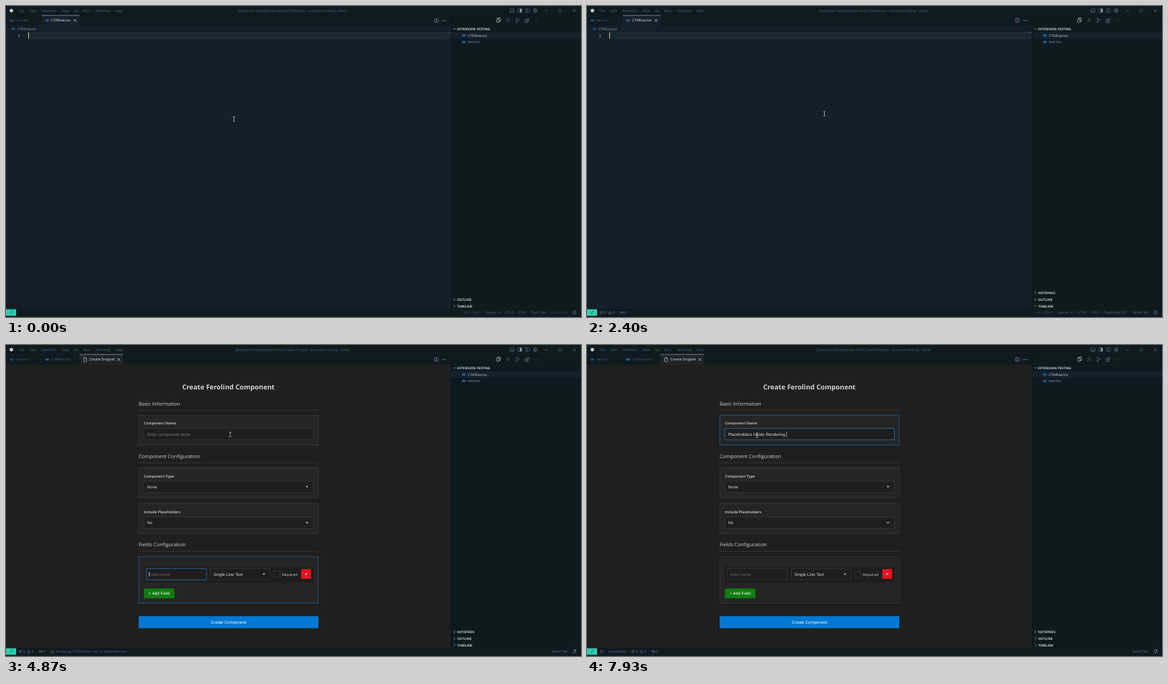
An HTML page for the animation above (8 s loop, 854 by 462 pixels).

```html
<!DOCTYPE html>
<html lang="en">
<head>
<meta charset="utf-8">
<title>Component snippet demo</title>
<style>
html, body { margin: 0; width: 100%; height: 100%; overflow: hidden; background: #101a21; }
svg { display: block; width: 854px; height: 462px; }
text { white-space: pre; text-rendering: geometricPrecision; }
</style>
</head>
<body>
<svg id="stage" viewBox="0 0 854 462" xmlns="http://www.w3.org/2000/svg"></svg>
<script>
const LOOP = 8000;
const UI = "'Open Sans', 'Noto Sans', sans-serif";
const FORM = "'Liberation Sans', Arial, sans-serif";
const DIM = '#526570', BLUE = '#0d6ebd';

// y is the vertical middle of the line
function text(x, y, str, o = {}) {
  const { size = 5.5, fill = DIM, weight = 400, anchor = 'start', font = UI, id } = o;
  return `<text${id ? ` id="${id}"` : ''} x="${x}" y="${y + size * 0.355}" font-size="${size}" fill="${fill}" ` +
    `font-weight="${weight}" text-anchor="${anchor}" font-family="${font}">${str}</text>`;
}
const rect = (x, y, w, h, fill, extra = '') =>
  `<rect x="${x}" y="${y}" width="${w}" height="${h}" fill="${fill}" ${extra}/>`;
const frame = (x, y, w, h, fill, stroke, extra = '') =>
  rect(x, y, w, h, fill, `stroke="${stroke}" stroke-width=".6" rx="1" ${extra}`);
const line = (d, stroke = DIM, w = .7, extra = '') =>
  `<path d="${d}" fill="none" stroke="${stroke}" stroke-width="${w}" ${extra}/>`;
const ring = (x, y, r, stroke = DIM, w = .7) =>
  `<circle cx="${x}" cy="${y}" r="${r}" fill="none" stroke="${stroke}" stroke-width="${w}"/>`;
const group = (id, body, extra = '') => `<g id="${id}" ${extra}>${body}</g>`;
const fileMark = (x, y, fill = '#1c486f') => rect(x + .5, y - 1.7, 5, 3.4, fill, 'rx=".5"');
const cross = (x, y, r, c, w = .8) =>
  line(`M${x - r} ${y - r}l${2 * r} ${2 * r}m0 ${-2 * r}l${-2 * r} ${2 * r}`, c, w);

function titleBar() {
  const menus = [[19, 'File'], [35, 'Edit'], [52, 'Selection'], [82, 'View'], [101, 'Go'],
    [115, 'Run'], [133, 'Terminal'], [162, 'Help']];
  return rect(0, 0, 854, 462, '#101a21') +
    '<circle cx="8" cy="6.8" r="2.6" fill="#c4cdd2"/>' +
    menus.map(([x, s]) => text(x, 7, s, { size: 5.4 })).join('') +
    text(426, 7, '', { size: 5.05, anchor: 'middle', id: 'title' }) +
    [748.5, 760, 771.5].map(x => frame(x, 4, 6, 5.5, 'none', '#5f727d')).join('') +
    rect(763, 4, 3, 5.5, '#7c8e99') + line('M748.5 7.8h6', '#5f727d') + line('M774 4v5.5', '#5f727d') +
    ring(786, 6.8, 2.5, '#5f727d', 1) + ring(786, 6.8, .8, '#5f727d') +
    line('M800 7h5', '#5d707b') + frame(821, 5, 4, 4, 'none', '#5d707b') + cross(844, 7, 2, '#5d707b', .7);
}

function tabBar() {
  return rect(0, 14, 661, 15, '#101a21') +
    fileMark(5, 21.5) + text(14, 21.5, 'test.tsx', { fill: '#485b66' }) +
    group('tabFile', rect(53, 14, 56, 15, '#16212a') + rect(53, 13.6, 56, .9, '#7d8c95') + cross(102.5, 21.5, 1.9, '#d5dce0')) +
    fileMark(58, 21.5, '#23598e') + text(67, 21.5, 'CTARow.tsx', { id: 'tabName' }) +
    group('tabForm', rect(109, 14, 65, 15, '#1e2529') + rect(109, 13.6, 65, .9, '#7d8c95') +
      line('M115.5 18.5h2.6l1.6 1.6v4.6h-4.2zM118 18.5v1.8h1.7', '#c8d0d4', .6) +
      text(123.7, 21.5, 'Create Snippet', { fill: '#dfe5e8', weight: 500 }) + cross(167.5, 21.5, 1.9, '#d5dce0')) +
    frame(636.5, 18.7, 5.5, 5.5, 'none', '#8f86b0') + line('M639.2 18.7v5.5', '#b8738f') +
    [648.6, 650.8, 653].map(x => `<circle cx="${x}" cy="21.7" r=".6" fill="#8b9aa3"/>`).join('');
}

function sideBar() {
  const head = (y, s) => text(670, y, s, { size: 4.87, weight: 700, fill: '#c4cfd5' });
  const fold = y => line(`M665 ${y - 2}l2 2l-2 2`, '#9aa9b2');
  return rect(661, 14, 193, 436, '#0f1920') + line('M661.2 14v436', '#0b141a', .8) +
    frame(728.5, 19.5, 3.6, 4.8, 'none', '#dbe2e6') + line('M730 19.5v-1.6h4v5h-1.8', '#dbe2e6') +
    ring(746, 20.7, 1.9) + line('M744.7 22.2l-2 2.2') +
    ring(758.2, 19, .9) + ring(761.5, 20.5, .9) + ring(758.2, 24, .9) + line('M758.2 20v3M761.5 21.4q0 1.4-3 1.8') +
    line('M770.5 20h2.6v4.6h-2.6zM773 22.3h2.5v2.3h-2.5M774 18.5h2.8v2.6h-2.8z', '#5d717d') +
    line('M786.4 21l1.7 1.4l1.7-1.4', '#43545f') +
    rect(661.5, 39, 192.5, 9.6, '#15222b') +
    line('M664 33l2 2l2-2', '#9aa9b2') + head(34, 'EXTENSION-TESTING') +
    fileMark(677, 43.7, '#23598e') + text(686, 43.7, 'CTARow.tsx', { size: 5.4, fill: '#bcc9d0' }) +
    fileMark(677, 53.5, '#23598e') + text(686, 53.5, 'test.tsx', { size: 5.4, fill: '#8799a3' }) +
    group('notes', fold(426) + head(426, 'NOTEPADS')) +
    fold(436) + head(436, 'OUTLINE') + fold(445.8) + head(445.8, 'TIMELINE');
}

function editor() {
  return rect(0, 29, 661, 421, '#151f27') + fileMark(8, 34) +
    text(16.5, 34, 'CTARow.tsx', { size: 5.4, fill: '#8496a0' }) +
    rect(33, 39, 628, 10, '#1b2831') + line('M33 39.3h628M33 48.7h628', '#26353f', .6) +
    rect(655.5, 38.8, 5.5, .9, '#505a46') +
    text(21, 44, '1', { size: 5.8, fill: '#b6c1c7', anchor: 'end', font: "'Noto Sans Mono', monospace" }) +
    rect(33, 39, .9, 9.8, '#e3d9a8', 'id="caret"');
}

function statusBar() {
  const s = (x, str, fill = '#526873') => text(x, 455.5, str, { size: 5.08, fill });
  const counts = ring(21.5, 455.3, 2, '#6b808b', .6) + cross(21.5, 455.3, .8, '#6b808b', .5) + s(25.5, '0', '#6b808b') +
    line('M31.5 457.3l2.3-4l2.3 4z', '#6b808b', .6) + s(38.3, '0', '#6b808b') +
    line('M49.3 453.3l1 3.6l1.3-3l1.3 3l1-3.6', '#6b808b', .7) + s(55.6, '0', '#6b808b');
  return rect(0, 450, 854, 12, '#101a21') + rect(0, 450.5, 15, 9.7, '#2ad0ae') +
    line('M6 455l2 1.5l-2 1.5M9.5 452l-2 1.5l2 1.5', '#0c5d50', .7) +
    group('counts', counts) +
    group('launch', ring(20.7, 457, .8) + ring(20.7, 453.5, .8) + line('M23 457l4-4') + line('M21 455h3') + s(32, 'Launchpad', '#61757f')) +
    group('busy', group('spin', line('M67.2 455.3a2 2 0 1 1 2 2', '#7d919b', .7)) +
      s(74, "Analyzing 'CTARow.tsx' and its dependencies")) +
    group('plain', s(680, 'Ln 1, Col 1') + s(712, 'Spaces: 4') + s(740, 'UTF-8') + s(761, 'CRLF') + s(780, 'Plain Text')) +
    group('script', s(667, 'Ln 1, Col 1') + s(699, 'Spaces: 4') + s(728, 'UTF-8') + s(749, 'CRLF') + s(768, 'TypeScript JSX')) +
    text(834, 455.5, 'Zelvin Tab', { size: 5.08, anchor: 'end', id: 'assist' }) +
    line('M841.6 457h5l-.8-1.2v-1.4a1.7 1.7 0 0 0-3.4 0v1.4zM843.5 458.2h1.2', '#7b8d97', .6) +
    group('dot', '<circle cx="846" cy="453.4" r="1" fill="#9fb0b9"/>');
}

function form() {
  const f = (x, y, s, fill = '#d6d6d6', extra = {}) => text(x, y, s, { size: 6.22, fill, font: FORM, ...extra });
  const section = (y, s) => text(197, y, s, { size: 7.5, fill: '#cfcfcf' }) + line(`M197 ${y + 9.7}h267`, '#444', .6);
  const label = (y, s) => text(204.7, y, s, { size: 5.45, fill: '#d4d4d4', weight: 600 });
  const card = (y, h) => frame(197.3, y, 266.4, h, '#252525', '#454545');
  const focus = (id, y, h, x2, y2, w2) => group(id,
    frame(197.3, y, 266.4, h, 'none', BLUE) + frame(x2, y2, w2, 17, 'none', '#1580d6', 'stroke-width=".9"'));
  const box = (x, y, w) => frame(x, y, w, 17, '#1e1e1e', '#414141');
  const select = (x, y, w, s) => box(x, y, w) + f(x + 4.7, y + 8.6, s) +
    `<path d="M${x + w - 11.7} ${y + 7.5}h4.6l-2.3 2.5z" fill="#a5a5a5"/>`;
  return rect(0, 29, 661, 421, '#1f1f1f') +
    text(330.3, 62.7, 'Create Ferolind Component', { size: 10, weight: 700, fill: '#d6d6d6', anchor: 'middle' }) +
    section(87, 'Basic Information') + card(104.2, 44.3) + label(116.3, 'Component Name') + box(204.8, 123.9, 251.6) +
    f(209.4, 132.4, 'Enter component name', '#777', { id: 'hint' }) + f(209.4, 132.4, '', '#e0e0e0', { id: 'typed' }) +
    focus('nameFocus', 104.2, 44.3, 204.8, 123.9, 251.6) + rect(0, 128.8, .6, 7.6, '#e6e6e6', 'id="nameCaret"') +
    section(165.4, 'Component Configuration') + card(182.3, 44.2) + label(194.7, 'Component Type') +
    select(204.8, 202.1, 251.6, 'None') +
    card(235.7, 44.2) + label(247.8, 'Include Placeholders') + select(204.8, 255.5, 251.6, 'No') +
    section(296.7, 'Fields Configuration') + card(314.4, 69) +
    rect(204.5, 329, 252.5, 23.4, '#1d1d1d', 'rx="1"') + box(208.2, 332, 89.5) + f(212.5, 340.7, 'Field name', '#696969') +
    select(303.3, 332, 89, 'Single Line Text') + frame(397.7, 336, 9.2, 9.2, '#1b1b1b', '#484848', 'rx="1.4"') +
    text(410, 340.6, 'Required', { size: 5.4, fill: '#cfcfcf' }) +
    rect(438.5, 332.8, 14.6, 14.6, '#e81123', 'id="remove" rx="1"') + cross(445.8, 340.2, 1.5, '#fff', .8) +
    rect(204.7, 361.7, 45.5, 14.6, '#107c10', 'rx="1"') + f(227.4, 369, '+ Add Field', '#fff', { anchor: 'middle' }) +
    focus('fieldFocus', 314.4, 69, 208.2, 332, 89.5) + rect(212.4, 336.8, .6, 7.4, '#ddd', 'id="fieldCaret"') +
    rect(197, 402.8, 267, 18, '#0078d4', 'rx="1"') + f(330.4, 412, 'Create Component', '#fff', { anchor: 'middle' });
}

function palette() {
  const rows = ['Create Ferolind component', 'Developer: Reload Window|Ctrl+Shift+R', 'Developer: Reload Webviews',
    'Zelvin: New Chat|Ctrl+N', 'Open QN Nook Settings', 'Preferences: Color Theme|Ctrl+M Ctrl+T',
    'Developer: Generate Color Theme From Current Settings', 'Accounts: Manage Trusted Extensions For Account',
    'Add Context to Background for Cmd K', 'Add Marker Above|Ctrl+Alt+UpArrow', 'Add Marker Below|Ctrl+Alt+DownArrow',
    'Add Markers To Bottom', 'Add Markers to Line Ends|Shift+Alt+I', 'Add Markers To Top',
    'Add Data Breakpoint at Address', 'Add Function Breakpoint', 'Add Line Comment', 'Add New Custom Docs',
    'Add Selection To Next Find Match|Ctrl+D'];
  const widths = { Ctrl: 13, Alt: 11, Shift: 14.5, UpArrow: 25, DownArrow: 31 };
  function keys(y, combo) {
    let x = 551, out = '';
    combo.split(' ').reverse().forEach(chord => {
      chord.split('+').reverse().forEach((key, i) => {
        if (i) { out += text(x - 3, y, '+', { size: 4.7, fill: '#8fa0aa', anchor: 'middle' }); x -= 6; }
        const w = widths[key] || 9;
        x -= w;
        out += frame(x, y - 3.8, w, 7.4, '#1d2c37', '#3a4c58') +
          text(x + w / 2, y - .2, key, { size: 4.6, fill: '#8fa0aa', anchor: 'middle' });
      });
      x -= 4.5;
    });
    return out;
  }
  const gear = (y, c) => ring(548, y, 2.1, c, 1.1) + ring(548, y, .7, c, .6);
  const list = rows.map((row, i) => {
    const y = 36.5 + 9.78 * i, [name, combo] = row.split('|');
    const hot = i === 0 || i === 13;
    return text(301, y, name, { fill: hot ? '#e8eef1' : '#93a3ad', weight: i ? 400 : 600, size: i ? 5.5 : 5.3 }) +
      (combo ? keys(y, combo) : '');
  }).join('');
  const tag = (x, y, s) => text(x, y, s, { size: 5.1, fill: '#d4dde2', weight: 600, anchor: 'end' });
  return rect(294.5, 14, 266.5, 199, '#17232c', 'rx="1.5"') +
    frame(297, 18, 261, 11, '#14202a', '#2f5878') + text(300, 23.8, '&gt;', { fill: '#c6d0d6' }) +
    rect(303.3, 20, .6, 7.6, '#e6ecef') +
    '<clipPath id="clip"><rect x="294.5" y="30" width="266.5" height="183"/></clipPath><g clip-path="url(#clip)">' +
    rect(295, 31.6, 266, 9.8, '#2b4257') + line('M295 100.2h266', '#26353f', .5) +
    rect(295, 158.7, 266, 9.8, '#1c2a34') + list +
    tag(542, 36.5, 'recently used') + tag(552.5, 105, 'other commands') + gear(36.5, '#3c566b') + gear(163.6, '#ccd6db') + '</g>';
}

const pointer = group('beam', line('M-1.5-3.5q1.5 0 1.5 .7v5.6q0 .7-1.5 .7M1.5-3.5q-1.5 0-1.5 .7M1.5 3.5q-1.5 0-1.5-.7', '#d5dadd', .7)) +
  group('arrow', '<path d="M0 0v7.6l1.8-1.6l1.2 2.8l1.2-.5l-1.2-2.8h2.5z" fill="#fff" stroke="#111" stroke-width=".4"/>') +
  group('wait', ring(6, 1, 2.8, '#1f97e0', 1.4)) +
  group('hand', '<path d="M-.9.8Q0-.6.9.8V3.4Q3.9 3.4 4 5V6.6L3 9H-1.4L-3.4 6Q-3.2 4.6-1.8 5.4L-.9 6z" fill="#fff" stroke="#111" stroke-width=".4"/>');

document.getElementById('stage').innerHTML = titleBar() + group('edit', editor()) + group('form', form()) +
  tabBar() + sideBar() + statusBar() + group('palette', palette()) + group('mouse', pointer);

const $ = id => document.getElementById(id);
const show = (id, on) => $(id).setAttribute('display', on ? 'inline' : 'none');
const set = (id, key, value) => $(id).setAttribute(key, value);
const ramp = (t, a, d) => Math.min(1, Math.max(0, (t - a) / d));
const ease = k => k * k * (3 - 2 * k);
const within = (t, a, b) => t >= a && t < b;

const OPEN = 3930, FOCUS = 4890, BLINK = 333;
const PHRASE = 'Placeholders Inside Rendering ';
const path = [[0, 338.5, 168], [1600, 338.5, 168], [1930, 352, 166], [2200, 352, 166], [2400, 352.5, 160], [2670, 353.5, 160],
  [2930, 353.5, 160], [3000, 355.5, 159.5], [3270, 355.5, 159.5], [3700, 346.5, 161], [3800, 346.5, 161], [4080, 288, 277.5],
  [4230, 288, 277.5], [4800, 333, 133], [5000, 333, 133], [5600, 252.5, 134], [LOOP, 252.5, 134]];

function mouseAt(t) {
  const i = path.findIndex(p => p[0] > t);
  const [t0, x0, y0] = path[i - 1], [t1, x1, y1] = path[i];
  const k = ease((t - t0) / (t1 - t0));
  return [x0 + (x1 - x0) * k, y0 + (y1 - y0) * k];
}

// Two bursts of typing, then three slower keys
function typedCount(t) {
  if (t < 5770) return 0;
  if (t < 6865) return Math.min(13, 1 + Math.floor((t - 5770) / 70));
  if (t < 7725) return Math.min(27, 14 + Math.floor((t - 6865) / 56));
  return t < 7825 ? 28 : t < 7925 ? 29 : 30;
}

function editorCaret(t) {
  if (t < 660) return t < 195 || t >= 525;
  return within(t, 995, 3665) && Math.floor((t - 995) / BLINK + .04) % 2 === 0;
}

function update(t) {
  const opened = t >= OPEN, menu = within(t, 660, 995), started = t >= 200;
  show('edit', !opened);
  show('form', opened);
  show('tabFile', !opened);
  show('tabForm', opened);
  set('tabName', 'fill', opened ? '#485b66' : '#e2e8eb');
  set('tabName', 'font-weight', opened ? 400 : 500);
  $('title').textContent = `[Extension Development Host] ${opened ? 'Create Snippet' : 'CTARow.tsx'} - extension-testing - Zelvin`;
  show('caret', editorCaret(t));
  show('palette', menu);

  show('notes', started);
  show('plain', !started);
  show('script', started && !opened);
  set('assist', 'fill', started ? '#5f747f' : '#3a4b55');
  show('counts', t >= 465);
  const launched = t >= 7130, busy = within(t, OPEN, 6870);
  show('launch', launched);
  set('counts', 'transform', `translate(${launched ? 47 : 0} 0)`);
  show('busy', busy);
  show('dot', opened);
  set('spin', 'transform', `rotate(${t * .54 % 360} 69.2 455.3)`);

  const shift = ramp(t, FOCUS - 20, 130), n = typedCount(t);
  set('nameFocus', 'opacity', shift);
  set('fieldFocus', 'opacity', 1 - shift);
  show('fieldCaret', t < FOCUS && Math.floor((t - OPEN) / BLINK) % 2 === 0);
  show('hint', n === 0);
  $('typed').textContent = PHRASE.slice(0, n);
  show('nameCaret', t >= FOCUS && (n > 0 || Math.floor((t - FOCUS) / BLINK) % 2 === 0));
  if (opened) set('nameCaret', 'x', 209.5 + (n ? $('typed').getComputedTextLength() : 0));
  const k = ramp(t, 4150, 200);
  set('remove', 'fill', `rgb(${197 + 35 * k},${15 + 2 * k},${31 + 4 * k})`);

  const [x, y] = mouseAt(t);
  const overName = x > 205 && x < 456 && y > 124 && y < 141;
  const beam = !menu && (!opened || overName);
  set('mouse', 'transform', `translate(${x} ${y})`);
  show('beam', beam);
  show('hand', menu);
  show('arrow', opened && !overName);
  show('wait', within(t, OPEN, 4500) && !overName);
}

const begin = performance.now();
function tick() {
  update((performance.now() - begin) % LOOP);
  requestAnimationFrame(tick);
}
tick();
</script>
</body>
</html>
```
